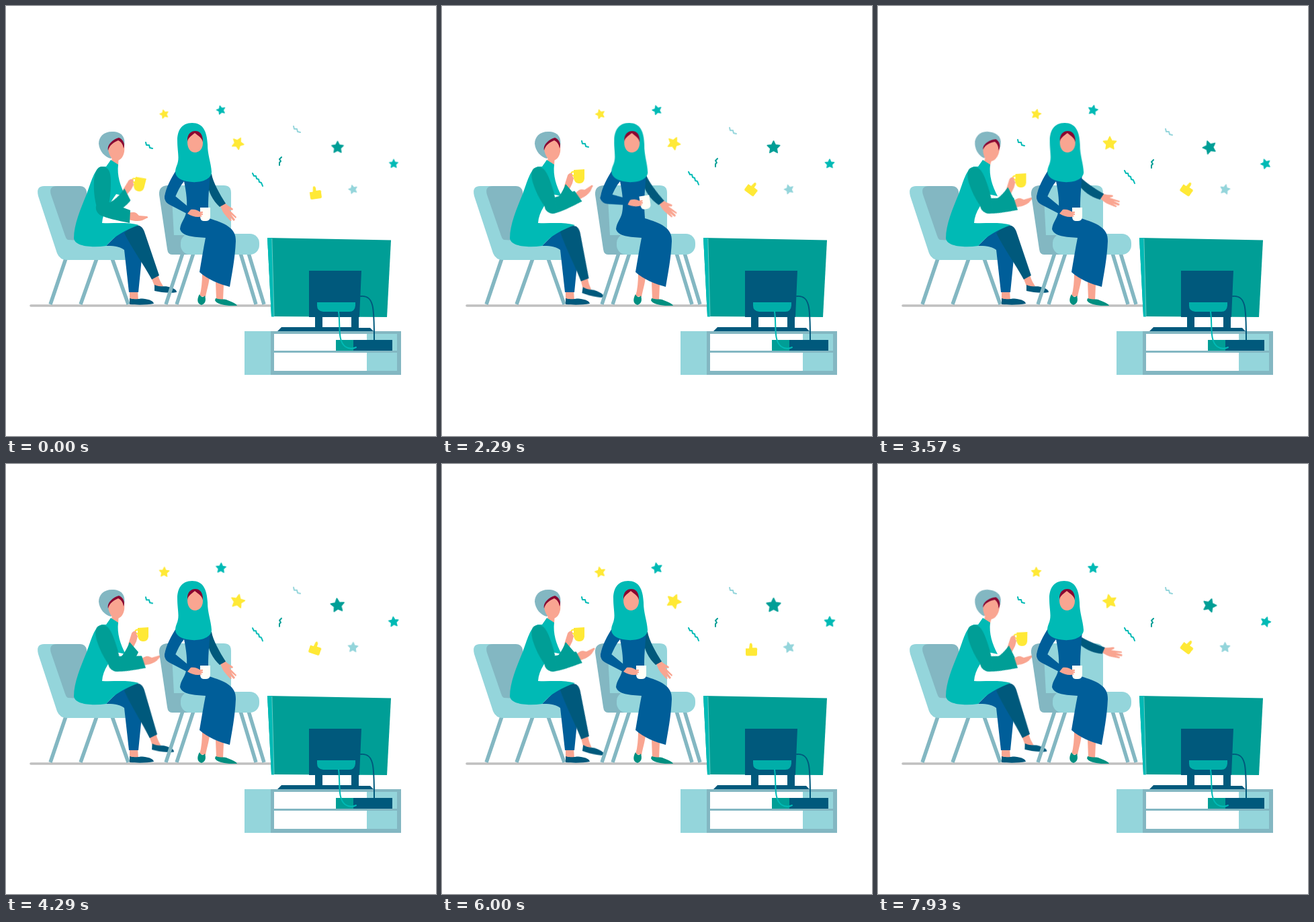
Animation of 640x640 px, one loop 8000 ms. Source, as an HTML page without scripts:

```html
<!DOCTYPE html>
<html lang="en">
<head>
<meta charset="utf-8">
<title>Two friends watching TV</title>
<style>
html, body { margin: 0; height: 100%; overflow: hidden; background: #fff; }
svg { display: block; width: 100vw; height: 100vh; }

.light { fill: #94d5db; }
.shade { fill: #83b7c2; }
.teal { fill: #00bab5; }
.green { fill: #009e96; }
.blue { fill: #005e99; }
.navy { fill: #00597c; }
.skin { fill: #f9a591; }
.yellow { fill: #ffe936; }
.maroon { fill: #8a0531; }
.line { fill: none; stroke-width: 2; stroke-linecap: round; stroke-linejoin: round; }
.legs { fill: none; stroke: #83b7c2; stroke-width: 5.5; }

.anim { animation: 8s cubic-bezier(.37, 0, .63, 1) infinite; }
.leg { animation-name: leg; transform-origin: 192px 335px; }
.head { animation-name: head; transform-origin: 160px 236px; }
.arm { animation-name: arm; transform-origin: 145px 250px; }
.lift { animation-name: lift; transform-origin: 147px 300px; }
.sip { animation-name: sip; transform-origin: 165px 302px; }
.mug { animation-name: mug; transform-origin: 190px 268px; }
.forearm { animation-name: forearm; transform-origin: 243px 286px; }
.cup { animation-name: cup; transform-origin: 273px 306px; }
.gesture { animation-name: gesture; transform-origin: 302px 268px; }
.hijab { animation-name: hijab; transform-origin: 278px 258px; }
.thumb { animation-name: thumb; }
.rise { --drift: -5px; animation-name: drift; }
.sink { --drift: 5px; animation-name: drift; }
.star { animation-name: star; stroke-width: 1.6; stroke-linejoin: round; }

@keyframes leg {
  0%, 45.75% { transform: none; }
  22.9%, 68.6% { transform: rotate(9.3deg); }
  91.5% { transform: none; animation-timing-function: cubic-bezier(.5, 0, .8, .6); }
  100% { transform: rotate(2.1deg); }
}
@keyframes head {
  0%, 29%, 53.5%, 74% { transform: none; }
  43%, 45% { transform: rotate(11deg); }
  96.5%, 100% { transform: rotate(11deg); }
}
@keyframes arm {
  0% { transform: none; }
  14.2%, 100% { transform: rotate(-21.5deg); }
}
@keyframes lift {
  0%, 18% { transform: none; }
  28%, 32% { transform: rotate(-17deg); }
  43%, 66% { transform: none; }
  82%, 86% { transform: rotate(-17deg); }
  97%, 100% { transform: none; }
}
@keyframes sip {
  0% { transform: translate(-16px, 1px) rotate(14deg); }
  14.2%, 30%, 53.5%, 86% { transform: translate(0, 0) rotate(0deg); }
  43%, 45% { transform: translate(1px, -1px) rotate(14deg); }
  97%, 100% { transform: translate(2px, -1px) rotate(15deg); }
}
@keyframes mug {
  0%, 30%, 53.5%, 86% { transform: none; }
  43%, 45%, 97%, 100% { transform: rotate(-14deg); }
}
@keyframes forearm {
  0%, 42%, 100% { transform: none; }
  13%, 30% { transform: rotate(-24deg); }
}
@keyframes cup {
  0%, 42%, 100% { transform: none; }
  13%, 30% { transform: rotate(15deg); }
}
@keyframes gesture {
  0%, 24%, 53%, 86% { transform: none; }
  38.5%, 40% { transform: rotate(-38deg); }
  98%, 100% { transform: rotate(-38deg); }
}
@keyframes hijab {
  0%, 16%, 54%, 100% { transform: none; }
  29%, 36% { transform: rotate(1.3deg); }
}
@keyframes thumb {
  0% { transform: translate(461px, 278px) rotate(-8deg); }
  15.1% { transform: translate(461px, 275px) rotate(5deg); }
  28.6% { transform: translate(462px, 272px) rotate(37deg); }
  44.6% { transform: translate(461px, 272px) rotate(34deg); }
  63.4% { transform: translate(461px, 277px) rotate(0deg); }
  85.8% { transform: translate(461px, 276px) rotate(0deg); }
  99.1%, 100% { transform: translate(461.5px, 272px) rotate(37deg); }
}
@keyframes drift {
  0% { transform: none; }
  63%, 100% { transform: translateY(var(--drift)); }
}
@keyframes star {
  0% { transform: rotate(var(--a)); }
  15.1% { transform: rotate(var(--b)) scale(1.03); }
  28.6% { transform: rotate(var(--c)) scale(1.06); }
  44.6% { transform: rotate(var(--d)) scale(1.1); }
  63.4% { transform: rotate(var(--e)) scale(1.18); }
  85.8% { transform: rotate(var(--f)) scale(1.18); }
  99.1%, 100% { transform: rotate(var(--g)) scale(1.12); }
}
.sway { --a: -15deg; --b: 14deg; --c: -17deg; --d: 12deg; --e: -8deg; --f: -16deg; --g: 0deg; }
.spin { --a: 28deg; --b: -4deg; --c: 26deg; --d: 0deg; --e: 25deg; --f: 22deg; --g: -12deg; }
.turn { --a: 0deg; --b: 30deg; --c: 0deg; --d: -20deg; --e: 10deg; --f: -9deg; --g: 18deg; }
</style>
</head>
<body>
<svg viewBox="0 0 640 640">
  <defs>
    <path id="star" d="M0-9L2.6-3.6 8.6-2.8 4.3 1.4 5.3 7.3 0 4.5-5.3 7.3-4.3 1.4-8.6-2.8-2.6-3.6Z"/>
  </defs>

  <path d="M37 446H396" stroke="#c0c0c0" stroke-width="3.6" stroke-linecap="round"/>

  <!-- left chair -->
  <path class="legs" d="M89 376L66 444M135 376L111 444M158 376L182 444"/>
  <path class="light" d="M57 268H110L125 346H179V378H91Q80 378 76 368L48 283Q44 268 57 268Z"/>
  <path class="shade" d="M76 268H110Q118 268 120 276L126 350 92 348Q89 346 88 342L67 281Q63 268 76 268Z"/>

  <!-- left woman -->
  <g>
    <path class="skin" d="M184 424H196L197 438H184Z"/>
    <path class="navy" d="M184 435C192 438 202 434 207 436 214 437 219 439 220 443 210 445 195 445 184 444Z"/>
    <path class="blue" d="M149 357L172 334 196 327 202 376 197 426H183L176 363C168 357 158 357 149 357Z"/>
    <g class="anim leg">
      <path class="skin" d="M216 404L226 399C228 408 231 412 234 417L222 419Z"/>
      <path class="navy" d="M221 415C230 419 238 416 242 418 249 420 254 422 254 426 243 428 230 426 221 424Z"/>
      <path class="navy" d="M176 338L186 329C198 323 204 328 207 339L228 401 217 407C205 385 188 362 176 338Z"/>
    </g>
    <g class="anim head">
      <path class="skin" d="M158 220L168 222 167 237 157 234Z"/>
      <path class="shade" d="M158 187C145 187 138 195 138 205 139 216 147 225 156 227L176 208C178 195 172 187 158 187Z"/>
      <path class="skin" d="M152 213C155 205 162 202 168 199 176 203 177 210 176 217 174 227 169 230 164 230 158 230 153 222 152 213Z"/>
      <path class="maroon" d="M152 215C150 206 160 198 168 196 174 198 178 206 175 212 174 205 171 202 167 200 160 203 154 207 152 215Z"/>
    </g>
    <path class="teal" d="M156 229L167 236C165 252 170 268 178 283L164 280C156 292 144 306 143 323 160 324 180 321 198 326 180 332 160 343 149 357 128 360 103 358 101 346 101 325 111 302 120 280 127 262 131 242 143 239L149 239 156 229Z"/>
    <g class="anim sip">
      <g class="anim mug">
        <path d="M197 247C191 246 191 251 196 253" class="line" stroke="#ffe936"/>
        <path class="yellow" d="M196 244L212 243V257Q211 264 205 264H203Q197 263 196 256Z"/>
        <path class="skin" d="M182 268L187 252C190 247 195 248 194 253L196 256 194 264 189 274Z"/>
      </g>
      <path class="green" d="M156 297C168 292 176 285 184 265L197 280C194 288 186 298 176 305Z"/>
    </g>
    <g class="anim arm">
      <g class="anim lift">
        <path class="skin" d="M182 308C187 307 192 306 195 309L198 312 210 313Q213 315 209 316L203 319C197 321 190 320 182 318Z"/>
        <path class="green" d="M134 298C137 289 148 287 153 292L185 304 184 323C165 319 150 316 140 311 136 308 133 304 134 298Z"/>
      </g>
      <path class="green" d="M143 239C153 239 156 248 156 260 156 275 155 286 153 294L150 312C146 313 142 313 139 310 132 295 130 275 131 260 132 246 136 239 143 239Z"/>
    </g>
  </g>

  <!-- right chair -->
  <path class="legs" d="M263 368L238 444M279 368L254 444M349 368L372 444M361 368L384 444"/>
  <path class="shade" d="M240 267H262V345L280 370H247Q241 370 240 362L228 281Q227 268 240 267Z"/>
  <path class="light" d="M246 267H324Q335 267 335 278V342H250Z"/>
  <path class="shade" d="M250 341H268V369H250Z"/>
  <rect class="light" x="260" y="339" width="117" height="31" rx="14"/>

  <!-- right woman -->
  <g>
    <path class="skin" d="M292 398L303 403C302 414 299 422 297 433L288 432C291 422 292 410 292 398ZM312 410L324 415 323 438 313 437Z"/>
    <path fill="#008f80" d="M288 429C284 436 284 443 291 445 297 443 298 438 296 431 293 435 290 433 288 429ZM312 435C320 438 326 435 330 438 337 441 343 443 344 446H332C322 445 313 443 311 438Z"/>
    <g class="anim gesture">
      <path class="skin" d="M319 297L326 293C330 298 335 299 338 302L337 304 332 303 343 314 342 316 335 310 341 318 339 320 332 313 336 319 334 320 327 312C323 308 321 303 319 297Z"/>
      <path class="navy" d="M300 245L306 250C308 262 318 280 327 294L318 299C308 290 300 275 300 262Z"/>
    </g>
    <path class="blue" d="M254 243L304 246C303 265 301 280 301 300L302 316C325 323 343 330 342 350 341 375 336 400 333 418 318 414 300 407 288 396 291 378 294 360 297 345 280 344 262 343 259 332 260 322 266 317 268 308 271 295 268 275 265 261 259 268 255 277 252 284L246 292C239 292 236 289 236 284 238 270 246 256 254 243Z"/>
    <g class="anim forearm">
      <g class="anim cup">
        <path fill="#fffff8" d="M289 300H304V313Q304 320 298 320H294Q289 320 289 313Z"/>
        <path class="skin" d="M270 309L275 303C281 302 285 304 288 306L293 306V308H290L293 309V311H290L292 313C286 315 278 314 270 309Z"/>
      </g>
      <path class="blue" d="M236 283C236 289 238 293 244 296L269 309 275 302 252 283C248 278 238 278 236 283Z"/>
    </g>
    <g class="anim hijab">
      <path class="teal" d="M277 174C261 174 255 186 255 200 255 218 259 226 254 238 249 250 254 258 269 261 289 265 306 258 306 247 305 232 300 222 300 206 299 186 293 174 277 174Z"/>
      <path class="maroon" d="M270 202C269 190 276 186 281.500 186 288 186 293 190 293 202Z"/>
      <path class="skin" d="M270 203C270 197 275 194 281 189 287 194 293 197 293 204 293 213 287 218 281.500 218 275 218 270 212 270 203Z"/>
    </g>
  </g>

  <!-- cabinet -->
  <path class="light" d="M355 484H394V549H355Z"/>
  <path class="shade" d="M394 484H588V549H394Z"/>
  <path fill="#fff" d="M399 488H537V513H399ZM399 516H537V543H399Z"/>
  <path class="light" d="M537 488H582V513H537ZM537 516H582V543H537Z"/>
  <path class="green" d="M491 497H517V513H491Z"/>
  <path class="navy" d="M517 497H575V513H517Z"/>

  <!-- television -->
  <path class="green" d="M389 345L573 348.500 567 463 395 462Z"/>
  <path class="teal" d="M389 345L395.500 345 399 462.500H395Z"/>
  <path d="M395.800 346L399 462" stroke="#7fd3cf" stroke-width=".8"/>
  <path class="navy" d="M451 394H529L526 463H525V479H542L547 484H404L410 478H460V463H451ZM471 463V478H514V463Z" fill-rule="evenodd"/>
  <path fill="#00aea9" d="M463 441H520V446Q519 455 511 455H472Q463 454 463 446Z"/>
  <path class="line" stroke="#00597c" d="M528 432C548 430 548 450 548 497"/>
  <path class="line" stroke="#00bab5" d="M495 455C498 475 493 498 505 507 511 511 517 510 521 508"/>

  <!-- confetti -->
  <g class="line">
    <path class="anim rise" stroke="#00bab5" d="M208 203L209 207 213 207 214 211 218 212M367 249L369 253 372 253 373 257 376 258 377 262 380 263 382 268"/>
    <path class="anim sink" stroke="#94d5db" d="M428 179L429 183 433 183 434 187 438 188"/>
    <path class="anim sink" stroke="#009e96" d="M410 225L407 228 409 231 407 233 407 237"/>
  </g>
  <path class="anim thumb yellow" d="M-9-2H-4L-3-9Q0-12 1-7V-3H7Q9-2 8 1V7Q8 9 5 9H-7Q-9 9-9 7Z"/>
  <g fill="#ffe936" stroke="#ffe936">
    <g transform="translate(235.500 161) scale(.73)"><use href="#star" class="anim star sway"/></g>
    <g transform="translate(345 204.500) scale(1)"><use href="#star" class="anim star spin"/></g>
  </g>
  <g fill="#00bab5" stroke="#00bab5">
    <g transform="translate(320 155) scale(.74)"><use href="#star" class="anim star sway"/></g>
    <g transform="translate(577 235) scale(.74)"><use href="#star" class="anim star turn"/></g>
  </g>
  <g fill="#009e96" stroke="#009e96" transform="translate(493.500 210.500) scale(1)"><use href="#star" class="anim star turn"/></g>
  <g fill="#94d5db" stroke="#94d5db" transform="translate(516.500 273) scale(.74)"><use href="#star" class="anim star sway"/></g>
</svg>
</body>
</html>
```
